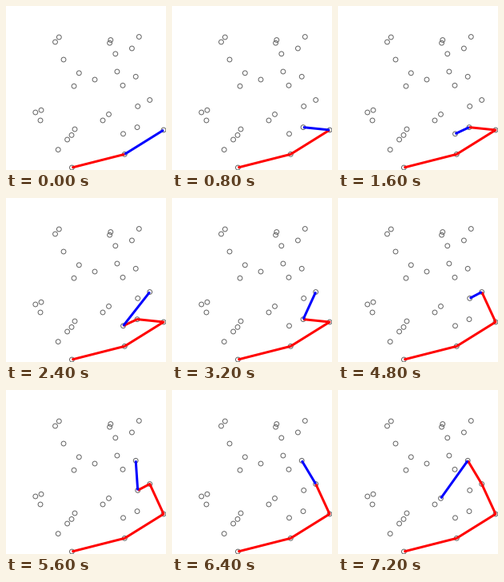
A matplotlib script for the animation above (8 s loop, 200 by 205 pixels).

```python
import math
import matplotlib.pyplot as plt
from matplotlib.animation import FuncAnimation
from matplotlib.patches import Circle

W, H, DPI = 200, 205, 80
PX = 72 / DPI  # points per pixel
STEPS, STEP_MS = 10, 800

# The scattered sites; every line drawn below is computed from them.
POINTS = [
    (66.3, 39), (61.5, 45), (72, 67), (91.3, 83.8), (85, 100.2), (111, 92),
    (130.8, 42.5), (129.6, 46.2), (136.8, 59.8), (157.4, 53), (166.3, 38.5),
    (138.9, 82), (162.2, 88.3), (146, 99.3), (179.7, 117.5), (164.7, 125.4),
    (128.5, 135.4), (121, 143), (44, 130.2), (36.8, 133), (43, 143),
    (86, 154), (82, 161.4), (76.6, 167), (65.2, 179.6), (146.5, 159.8),
    (164, 151.6), (197, 155), (148.3, 185.3), (82.4, 202),
]


def turns_left(a, b, c):
    return (b[0] - a[0]) * (c[1] - a[1]) < (b[1] - a[1]) * (c[0] - a[0])


def graham_steps(points, count):
    """List (hull so far, tested point) for each step of a Graham scan."""
    start = max(points, key=lambda p: p[1])
    rest = sorted((p for p in points if p != start),
                  key=lambda p: math.atan2(start[1] - p[1], p[0] - start[0]))
    stack, steps, i = [start, rest[0]], [], 1
    while len(steps) < count:
        steps.append((stack[:], rest[i]))
        if turns_left(stack[-2], stack[-1], rest[i]):
            stack.append(rest[i])
            i += 1
        else:
            stack.pop()
    return steps


steps = graham_steps(POINTS, STEPS)

fig = plt.figure(figsize=(W / DPI, H / DPI), dpi=DPI, facecolor="white")
ax = fig.add_axes([0, 0, 1, 1])
ax.set(xlim=(0, W), ylim=(H, 0))
ax.axis("off")

for p in POINTS:
    ax.add_patch(Circle(p, 2.9, fill=False, ec="#666666", lw=PX, zorder=1))

style = dict(lw=3 * PX, solid_capstyle="butt", solid_joinstyle="round")
hull, = ax.plot([], [], color="#ff0000", zorder=2, **style)
probe, = ax.plot([], [], color="#0000ff", zorder=3, **style)


def draw(i):
    stack, tested = steps[i]
    hull.set_data(*zip(*stack))
    probe.set_data(*zip(stack[-1], tested))
    return hull, probe


anim = FuncAnimation(fig, draw, frames=STEPS, interval=STEP_MS,
                     repeat=True, repeat_delay=0)
plt.show()
```
